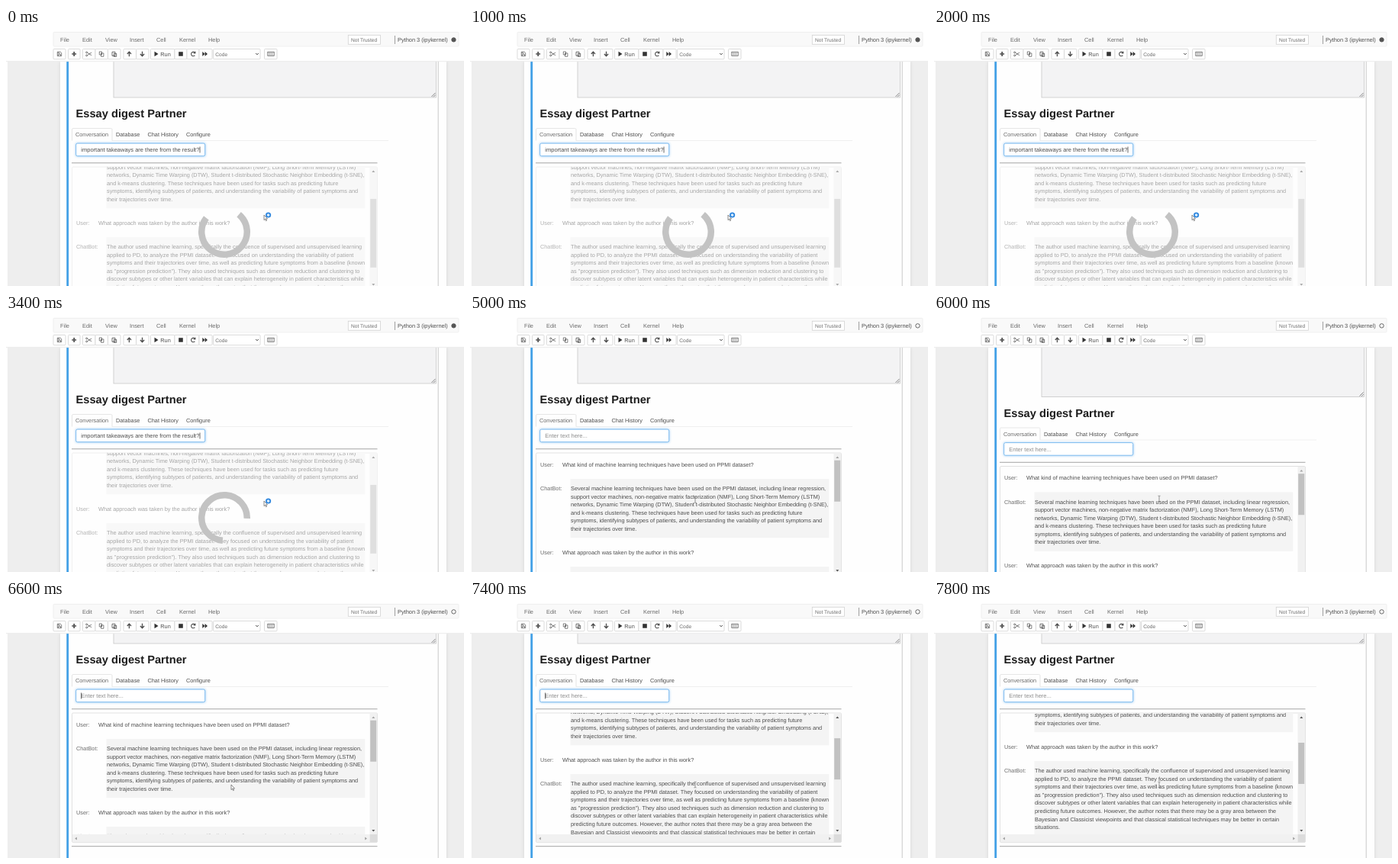
Animation of 600 by 338 pixels, one loop 8 s. Source, as an HTML page:

```html
<!DOCTYPE html>
<html lang="en">
<head>
<meta charset="utf-8">
<title>Notebook chat</title>
<style>
  html, body { margin: 0; width: 100%; height: 100%; overflow: hidden; background: #fff; }
  svg { display: block; width: 600px; height: 338px; }
  text { font: 7.33px "Liberation Sans", Arial, sans-serif; text-rendering: geometricPrecision; fill: #4c4c4c; white-space: pre; }
  .menu text { font-size: 7.4px; fill: #6a6a6a; }
  .menu .small { font-size: 6.6px; }
  .title { font-size: 14.66px; font-weight: bold; fill: #1c1c1c; }
  .field { font-size: 7.5px; }
  .label { fill: #6a6a6a; }
  .btn { fill: #fff; stroke: #d2d2d2; stroke-width: .8; }
  .icon { fill: none; stroke: #4c4c4c; stroke-width: 1; }
  .solid { fill: #333; }
</style>
</head>
<body>
<svg viewBox="0 0 600 338">
  <defs>
    <clipPath id="view"><rect x="87" y="182" width="389.5" height="159"/></clipPath>
    <filter id="glow" x="-10%" y="-60%" width="120%" height="220%"><feGaussianBlur stdDeviation="1.4"/></filter>
    <filter id="shade" x="-5%" y="-5%" width="110%" height="110%"><feGaussianBlur stdDeviation="2"/></filter>
  </defs>

  <rect x="2" y="44" width="598" height="294" fill="#eee"/>
  <rect x="71" y="44" width="506" height="310" fill="#d4d4d4" filter="url(#shade)"/>
  <rect x="71" y="44" width="506" height="294" fill="#fefefe"/>
  <path d="M566.2 44V338" stroke="#c2c2c2" stroke-width=".9"/>
  <rect x="79.3" y="44" width="2.8" height="294" fill="#42a0e6"/>

  <g id="page">
    <rect x="141" y="-60" width="422.6" height="151" fill="#f3f3f4" stroke="#c8c8c8" stroke-width=".8"/>
    <path d="M557.5 90L562.5 85M560 90.3L562.7 87.6" stroke="#666" stroke-width=".8"/>
    <text class="title" x="91.5" y="117">Essay digest Partner</text>

    <path d="M139 147.5H501" stroke="#ebebeb" stroke-width=".8"/>
    <path d="M86.5 147.5V133q0-1.5 1.5-1.5H137.5q1.5 0 1.5 1.5V147.5" fill="none" stroke="#e0e0e0" stroke-width=".8"/>
    <g id="tabs"></g>

    <rect x="91" y="150.5" width="170.5" height="18" rx="2" fill="#8cc4f2" opacity=".75" filter="url(#glow)"/>
    <rect x="91.7" y="151.1" width="169" height="16.6" rx="2" fill="#fff" stroke="#7dbbef" stroke-width="1"/>
    <text class="field" id="field" x="98.3" y="162"></text>
    <path id="caret" d="M0 155.5V163.5" stroke="#222" stroke-width=".7"/>
    <path d="M86 176.8H486.5M86 356.7H486.5" stroke="#a4a4a4" stroke-width="1"/>

    <g id="chat">
      <rect x="86.5" y="182" width="400" height="169.6" rx="1.5" fill="#fefefe" stroke="#dadada" stroke-width=".8"/>
      <g clip-path="url(#view)"><g id="messages"></g></g>
      <rect x="476.5" y="182.4" width="9.6" height="158.6" fill="#f1f1f1"/>
      <rect x="87" y="341" width="389.5" height="10.2" fill="#f1f1f1"/>
      <rect x="476.5" y="341" width="9.6" height="10.2" fill="#dcdcdc"/>
      <path id="up" d="M479.3 189l2-2.6 2 2.6z"/>
      <path d="M479.3 335l2 2.6 2-2.6z" fill="#555"/>
      <path d="M92.8 344.4l-2.5 2 2.5 2zM470.3 344.4l2.5 2-2.5 2z" fill="#999"/>
      <rect id="thumb" x="477.2" width="8" fill="#c1c1c1"/>
    </g>
    <circle id="spinner" cx="286" cy="267" r="29.75" fill="none" stroke="#c3c3c3" stroke-width="8.5" pathLength="100" stroke-dasharray="74.3 25.7"/>
  </g>

  <rect x="0" y="0" width="600" height="44" fill="#fff"/>
  <path d="M0 43.7H600" stroke="#e4e4e4" stroke-width=".8"/>
  <g class="menu">
    <rect x="62" y="5.5" width="531" height="18.5" rx="1" fill="#f9f9f9" stroke="#ececec" stroke-width=".8"/>
    <g id="menu"></g>
    <rect class="btn" x="448.3" y="9.3" width="42.2" height="12"/>
    <text class="small" x="452" y="17.7">Not Trusted</text>
    <path d="M509.5 10V21" stroke="#888" stroke-width=".8"/>
    <text x="513" y="18" style="fill:#4c4c4c">Python 3 (ipykernel)</text>
    <circle id="kernel" cx="586.5" cy="15.4" r="2.7" stroke="#555" stroke-width=".9"/>
  </g>
  <g id="buttons"></g>
  <g class="icon">
    <path d="M67.3 31.3h4l1.4 1.4v4h-5.4zM68.6 31.5v1.7h2.3M68.5 36.5v-1.8h3v1.8" stroke-width=".7"/>
    <path d="M86.3 34H92.1M89.2 31.1V36.9" stroke-width="1.7"/>
    <path d="M106.7 32.3l5.4 3.6M106.7 35.7l5.4-3.6" stroke-width=".7"/>
    <circle cx="105.6" cy="32" r="1" stroke-width=".7"/><circle cx="105.6" cy="36" r="1" stroke-width=".7"/>
    <path d="M122.3 31h3.2v4h-3.2zM124.5 33h3.4v4.3h-3.4z" stroke-width=".7"/>
    <path d="M139 31.4h4v5h-4zM141.3 33.4h3.4v4h-3.4z" stroke-width=".8"/>
    <path d="M161.4 37.2V31.4M158.8 34L161.4 31.3 164 34M178.5 30.8V36.6M175.9 34L178.5 36.7 181.1 34" stroke-width="1.3"/>
    <path d="M247.4 32.4A2.7 2.7 0 1 0 247.4 35.8M247.9 30.8V33H245.6" stroke-width="1.1"/>
    <path d="M327.2 33l1.8 1.9 1.8-1.9" stroke-width="1"/>
    <rect x="342.8" y="31.4" width="8.4" height="5" stroke-width=".7"/>
    <path d="M344 33.1H350M344 34.8H350" stroke-width=".8" stroke-dasharray="1 .6"/>
  </g>
  <path class="solid" d="M194.5 30.8l5 3.2-5 3.2zM226.2 31.2h5.6v5.6h-5.6zM257.3 31l3.2 3-3.2 3zM260.6 31l3.4 3-3.4 3z"/>
  <text x="202.3" y="36.6">Run</text>
  <text x="274.3" y="37" style="font-size:6.6px;fill:#666">Code</text>

  <g id="cursor">
    <path id="arrow" d="M0 0V6.6L1.5 5.2 2.6 7.7 3.6 7.2 2.5 4.9H4.5z" fill="#fff" stroke="#444" stroke-width=".6"/>
    <circle id="busy" cx="5.6" cy="0" r="2.7" fill="#d9edff" stroke="#2e86de" stroke-width="1.8"/>
    <path id="beam" d="M-1.5-3.8H-.4L0-3.4 .4-3.8H1.5M0-3.4V3.4M-1.5 3.8H-.4L0 3.4 .4 3.8H1.5" fill="none" stroke="#666" stroke-width=".7"/>
  </g>
</svg>

<script>
const $ = id => document.getElementById(id);
const LOOP = 8000, TICK = 200, LOADED = 3600, LINE = 10.55;

function add(parent, tag, attrs, content = '') {
  const node = document.createElementNS(parent.namespaceURI, tag);
  for (const key in attrs) node.setAttribute(key, attrs[key]);
  node.textContent = content;
  return parent.appendChild(node);
}

const label = (parent, x, y, content, cls = '') => add(parent, 'text', { x, y, class: cls }, content);

[['File', 71], ['Edit', 100], ['View', 130], ['Insert', 162], ['Cell', 197], ['Kernel', 227], ['Help', 265]]
  .forEach(([name, x]) => label($('menu'), x, 18, name));
[['Conversation', 91], ['Database', 144], ['Chat History', 185.5], ['Configure', 236]]
  .forEach(([name, x], i) => label($('tabs'), x, 142, name, i ? '' : 'label'));
[[62, 16], [81.5, 15.5], [100.5, 16.5], [117, 16.5], [133.5, 16.5], [154, 16.5], [170.5, 16.5],
  [189.5, 31.5], [221, 16], [237, 16], [253, 17], [271.5, 61.5], [338.5, 16.5]]
  .forEach(([x, width]) => add($('buttons'), 'rect', { x, width, y: 27.5, height: 13.3, rx: 1, class: 'btn' }));

const talk = [
  { ask: 'What kind of machine learning techniques have been used on PPMI dataset?', y: 197, reply: [
    'Several machine learning techniques have been used on the PPMI dataset, including linear regression,',
    'support vector machines, non-negative matrix factorization (NMF), Long Short-Term Memory (LSTM)',
    'networks, Dynamic Time Warping (DTW), Student t-distributed Stochastic Neighbor Embedding (t-SNE),',
    'and k-means clustering. These techniques have been used for tasks such as predicting future',
    'symptoms, identifying subtypes of patients, and understanding the variability of patient symptoms and',
    'their trajectories over time.'] },
  { ask: 'What approach was taken by the author in this work?', y: 312, reply: [
    'The author used machine learning, specifically the confluence of supervised and unsupervised learning',
    'applied to PD, to analyze the PPMI dataset. They focused on understanding the variability of patient',
    'symptoms and their trajectories over time, as well as predicting future symptoms from a baseline (known',
    'as "progression prediction"). They also used techniques such as dimension reduction and clustering to',
    'discover subtypes or other latent variables that can explain heterogeneity in patient characteristics while',
    'predicting future outcomes. However, the author notes that there may be a gray area between the',
    'Bayesian and Classicist viewpoints and that classical statistical techniques may be better in certain',
    'situations.'] }
];
for (const { ask, y, reply } of talk) {
  const box = $('messages');
  label(box, 92, y + 2.7, 'User:', 'label');
  label(box, 121, y + 2.7, ask);
  add(box, 'rect', { x: 131.5, y: y + 19, width: 338.8, height: reply.length * LINE + 14, fill: '#f4f4f4' });
  label(box, 92, y + 34.2, 'ChatBot:', 'label');
  reply.forEach((line, i) => label(box, 132, y + 34.2 + i * LINE, line));
}

// Rows of [time, value], joined with a smooth ease.
function track(rows, t) {
  const i = rows.findIndex(row => row[0] > t);
  if (i === 0) return rows[0][1];
  if (i < 0) return rows[rows.length - 1][1];
  const [t0, a] = rows[i - 1], [t1, b] = rows[i];
  const p = (t - t0) / (t1 - t0);
  return a + (b - a) * p * p * (3 - 2 * p);
}
const pageY = [[5400, 0], [5900, 17.5], [6000, 17.5], [6500, -34]];
const chatScroll = [[6900, 0], [7600, 86]];
const cursorX = [[3600, 338], [4600, 295]];
const cursorY = [[3600, 245], [4600, 243.5], [5400, 243.5], [5900, 242]];

const show = (id, on) => $(id).setAttribute('visibility', on ? 'visible' : 'hidden');
const move = (id, x, y) => $(id).setAttribute('transform', `translate(${x} ${y})`);

function draw(t) {
  const loading = t < LOADED;
  const scroll = loading ? 57 : track(chatScroll, t);
  const content = loading ? 246 : 409;
  const rail = 139, view = 159;

  move('page', 0, track(pageY, t));
  move('messages', 0, -scroll);
  $('thumb').setAttribute('y', 191.7 + scroll * rail / content);
  $('thumb').setAttribute('height', rail * view / content);
  $('up').setAttribute('fill', scroll ? '#555' : '#a3a3a3');
  $('chat').setAttribute('opacity', loading ? .5 : 1);

  show('spinner', loading);
  $('spinner').setAttribute('transform', `rotate(${t * .36 - 50} 286 267)`);
  $('kernel').setAttribute('fill', t < 3800 ? '#555' : '#f9f9f9');

  $('field').textContent = loading ? 'important takeaways are there from the result?' : 'Enter text here...';
  $('field').style.fill = loading ? '#4c4c4c' : '#8c8c8c';
  const phase = t % 1000;
  move('caret', loading ? 254 : 98.6, 0);
  show('caret', loading ? phase < 500 : phase > 250 && phase < 750);

  const arrow = loading || (t > 6100 && t < 7000);
  move('cursor', track(cursorX, t), track(cursorY, t));
  show('arrow', arrow);
  show('busy', loading);
  show('beam', !arrow);
}

const start = performance.now();
function frame() {
  const t = (performance.now() - start) % LOOP;
  draw(Math.floor(t / TICK) * TICK);
  requestAnimationFrame(frame);
}
frame();
</script>
</body>
</html>
```
